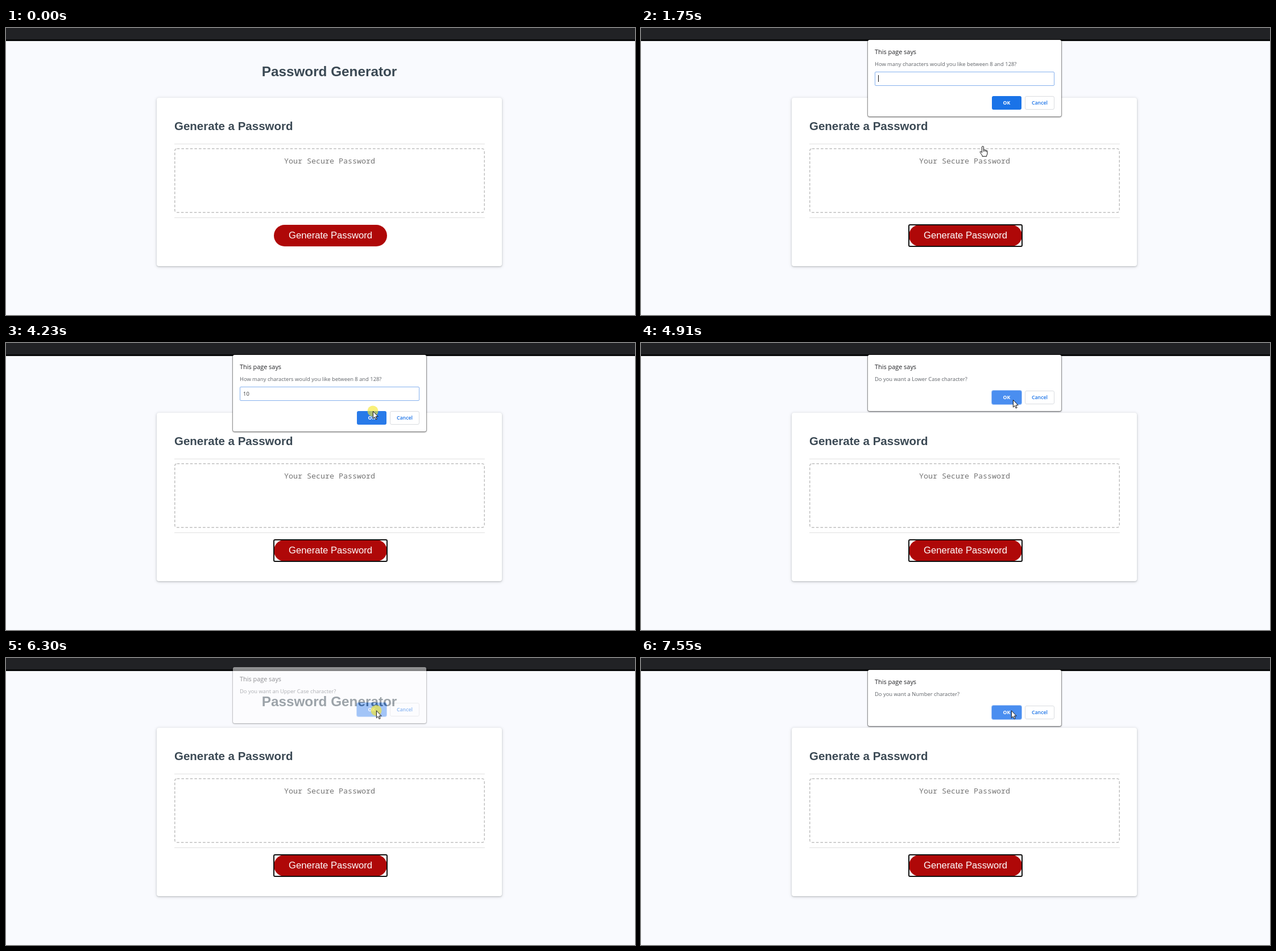
Animation of 1106 by 506 pixels, one loop 8 s. Source, as an HTML page:

```html
<!DOCTYPE html>
<html lang="en">
<head>
<meta charset="utf-8">
<title>Password Generator</title>
<style>
html, body { margin: 0; width: 100%; height: 100%; overflow: hidden; background: #f9fafe; }
body { position: relative; font-family: Arial, "Liberation Sans", sans-serif; color: #3b4954; }
body * { box-sizing: border-box; }
header, h1, h2, hr, .card, .frame, .placeholder, .generate, .ring, .dialog, .dialog > *, .cursor { position: absolute; margin: 0; }

header { left: 0; right: 0; top: 0; height: 23px; background: #212225; border-bottom: 3px solid #08090a; }
h1 { left: 265px; width: 607px; top: 62px; font-size: 24.3px; line-height: 30px; text-align: center; }
.card { left: 265px; top: 123px; width: 607px; height: 297px; background: #fff; border-radius: 4px;
  box-shadow: 0 1px 2px rgba(60,64,67,.25), 0 1px 5px 1px rgba(60,64,67,.14); }
h2 { left: 296px; top: 159px; font-size: 20.5px; line-height: 28px; }
hr { left: 296px; width: 546px; height: 1.5px; border: 0; background: #e1e1e1; }
.frame { left: 295px; top: 211px; }
.placeholder { left: 296px; width: 546px; top: 224px; text-align: center; color: #757575;
  font: 13.35px/20px "Noto Sans Mono", monospace; }
.generate { left: 471px; top: 347px; width: 199px; height: 38px; border-radius: 19px; background: #af0808;
  color: #fff; font-size: 16.65px; line-height: 38px; text-align: center; }
.ring { left: 470px; top: 346px; width: 201px; height: 40px; border: 2px solid #111; border-radius: 3px; }

.dialog { left: 399px; top: 21px; width: 340px; height: 99px; background: #fff; border-radius: 3px;
  font-family: "Open Sans", "Noto Sans", sans-serif;
  box-shadow: 0 0 0 1px rgba(0,0,0,.3), 0 1px 3px rgba(0,0,0,.5); }
.says { left: 12px; top: 13px; font-size: 10.9px; line-height: 16px; color: #202124; }
.question { left: 12px; top: 35px; height: 16px; overflow: hidden; font-size: 9.4px; line-height: 16px; color: #5f6368; white-space: nowrap; }
.questions div { height: 16px; }
.input { left: 12px; top: 56px; width: 316px; height: 25px; border: 1.5px solid #86b1ee; border-radius: 2px;
  font-size: 9.4px; line-height: 23px; padding-left: 5px; color: #303134; }
.caret { position: absolute; left: 5px; top: 5px; width: 1px; height: 12px; background: #111; }
.button { bottom: 12px; width: 52px; height: 24px; border-radius: 3px; font-size: 8.8px; font-weight: 600;
  line-height: 24px; text-align: center; }
.ok { left: 218px; color: #fff; font-weight: 700; }
.cancel { left: 276px; color: #1a73e8; border: 1px solid #dadce0; line-height: 22px; }
.cursor { left: 0; top: 0; width: 40px; height: 40px; overflow: visible; }

/* One percent of the loop is 80 ms. */
.cursor, .cursor > *, .ring, .dialog, .questions, .input, .input > *, .ok { animation: 8s step-end infinite; }
.cursor { animation-name: move; }
.cursor > .arrow { animation-name: arrow; }
.cursor > .hand { animation-name: hand; }
.cursor > .beam { animation-name: beam; }
.cursor > .click { animation-name: click; }
.ring { animation-name: focus; }
.dialog { animation-name: popup, resize; }
.questions { animation-name: ask; }
.input { animation-name: prompt; }
.input > .caret { animation-name: caret; }
.input > .one { animation-name: one; }
.input > .zero { animation-name: zero; }
.ok { animation-name: hover; }

@keyframes move {
  0% { transform: translate(1011px,413px); opacity: 0; }
  1.375% { transform: translate(1011px,413px); opacity: 1; animation-timing-function: steps(3); }
  4.3% { transform: translate(918px,340px); opacity: 1; animation-timing-function: steps(2); }
  6.25% { transform: translate(800px,316px); animation-timing-function: steps(2); }
  8.2% { transform: translate(665px,346px); animation-timing-function: steps(3); }
  11.125% { transform: translate(590px,360px); }
  12% { transform: translate(588px,360px); }
  13%, 18.84% { transform: translate(587px,360px); }
  18.84% { animation-timing-function: steps(3); }
  21.8% { transform: translate(601px,208px); animation-timing-function: steps(4); }
  25.75% { transform: translate(591px,112px); animation-timing-function: steps(5); }
  30.25%, 45.925% { transform: translate(597px,92px); }
  45.925% { animation-timing-function: steps(6); }
  51.6%, 54.44% { transform: translate(645px,120px); }
  56.375%, 58.275% { transform: translate(646px,122px); }
  58.275% { animation-timing-function: steps(3); }
  61.2% { transform: translate(654px,100px); animation-timing-function: steps(3); }
  64.125%, 100% { transform: translate(651px,92.5px); opacity: 1; }
}
@keyframes arrow {
  0%, 22.75%, 47.5%, 100% { opacity: 1; }
  9.1%, 27.5% { opacity: 0; }
}
@keyframes hand { 0%, 22.75%, 100% { opacity: 0; } 9.1% { opacity: 1; } }
@keyframes beam { 0%, 47.5%, 100% { opacity: 0; } 27.5% { opacity: 1; } }
@keyframes click {
  0%, 17.85%, 53.5%, 66.08%, 78.85%, 91.45%, 100% { opacity: 0; }
  15.875%, 51.9%, 64.125%, 76.875%, 89.5% { opacity: 1; }
}
@keyframes focus { 0% { opacity: 0; } 15.875%, 100% { opacity: 1; } }
@keyframes popup {
  0%, 54.44%, 67.05%, 78.83%, 92.43% { opacity: 0; transform: none; }
  17.85%, 53.5%, 55.4%, 66.08%, 68.03%, 77.85%, 79.8%, 91.45%, 93.4% { opacity: .5; transform: translateY(-5%); }
  18.84%, 56.375%, 69%, 80.75%, 94.375%, 100% { opacity: 1; transform: none; }
}
@keyframes resize { 0% { height: 135px; } 54.44%, 100% { height: 99px; } }
@keyframes prompt { 0% { opacity: 1; } 54.44%, 100% { opacity: 0; } }
@keyframes caret { 0% { opacity: 1; } 26.625%, 100% { opacity: 0; } }
@keyframes one { 0% { opacity: 0; } 37.125%, 100% { opacity: 1; } }
@keyframes zero { 0% { opacity: 0; } 40.25%, 100% { opacity: 1; } }
@keyframes ask {
  0% { transform: none; }
  54.44% { transform: translateY(-16px); }
  67.05% { transform: translateY(-32px); }
  78.83% { transform: translateY(-48px); }
  92.43%, 100% { transform: translateY(-64px); }
}
@keyframes hover {
  0% { background: #1a73e8; box-shadow: none; }
  51.6% { background: #287ae9; box-shadow: none; }
  54.44% { background: #1a73e8; box-shadow: 0 0 0 1px rgba(74,142,240,.55); }
  60.2%, 100% { background: #4a8ef0; box-shadow: 0 0 0 1px rgba(74,142,240,.55); }
}
</style>
</head>
<body>
<header></header>
<h1>Password Generator</h1>
<div class="card"></div>
<h2>Generate a Password</h2>
<hr style="top:203.5px">
<svg class="frame" width="548" height="116">
  <rect x="1.75" y="1.75" width="544.5" height="112.5" rx="4" fill="none" stroke="#bfbfbf" stroke-width="1.5" stroke-dasharray="4.6 3.05"/>
</svg>
<div class="placeholder">Your Secure Password</div>
<hr style="top:333.5px">
<div class="generate">Generate Password</div>
<div class="ring"></div>

<div class="dialog">
  <div class="says">This page says</div>
  <div class="question"><div class="questions">
    <div>How many characters would you like between 8 and 128?</div>
    <div>Do you want a Lower Case character?</div>
    <div>Do you want an Upper Case character?</div>
    <div>Do you want a Special character?</div>
    <div>Do you want a Number character?</div>
  </div></div>
  <div class="input"><i class="caret"></i><span class="one">1</span><span class="zero">0</span></div>
  <div class="button ok">OK</div>
  <div class="button cancel">Cancel</div>
</div>

<svg class="cursor" fill="#fff" stroke="#111" stroke-linejoin="round">
  <circle class="click" r="9.5" fill="#f5e628" fill-opacity=".62" stroke="none"/>
  <path class="arrow" d="M.4 .4V13.2L3.2 10.5L5.2 15L7.2 14.1L5.2 9.7H9.2Z"/>
  <g class="hand">
    <path d="M-1.5 1.7Q-1.5 .5 0 .5T1.5 1.7V7Q3 6 4 7.4Q5.5 6.6 6.3 8Q8 7.6 8 9.5V13Q8 15 6.7 16.8V18.3H-1V16.8L-4.6 11.5Q-5.4 9.4-3.8 9.6L-1.5 11.5Z"/>
    <path d="M1.5 7V10M4 7.4V10M6.3 8V10.5" fill="none"/>
  </g>
  <path class="beam" d="M-2.5-6.5H-.7L0-6L.7-6.5H2.5M0-6V6M-2.5 6.5H-.7L0 6L.7 6.5H2.5" fill="none"/>
</svg>
</body>
</html>
```
